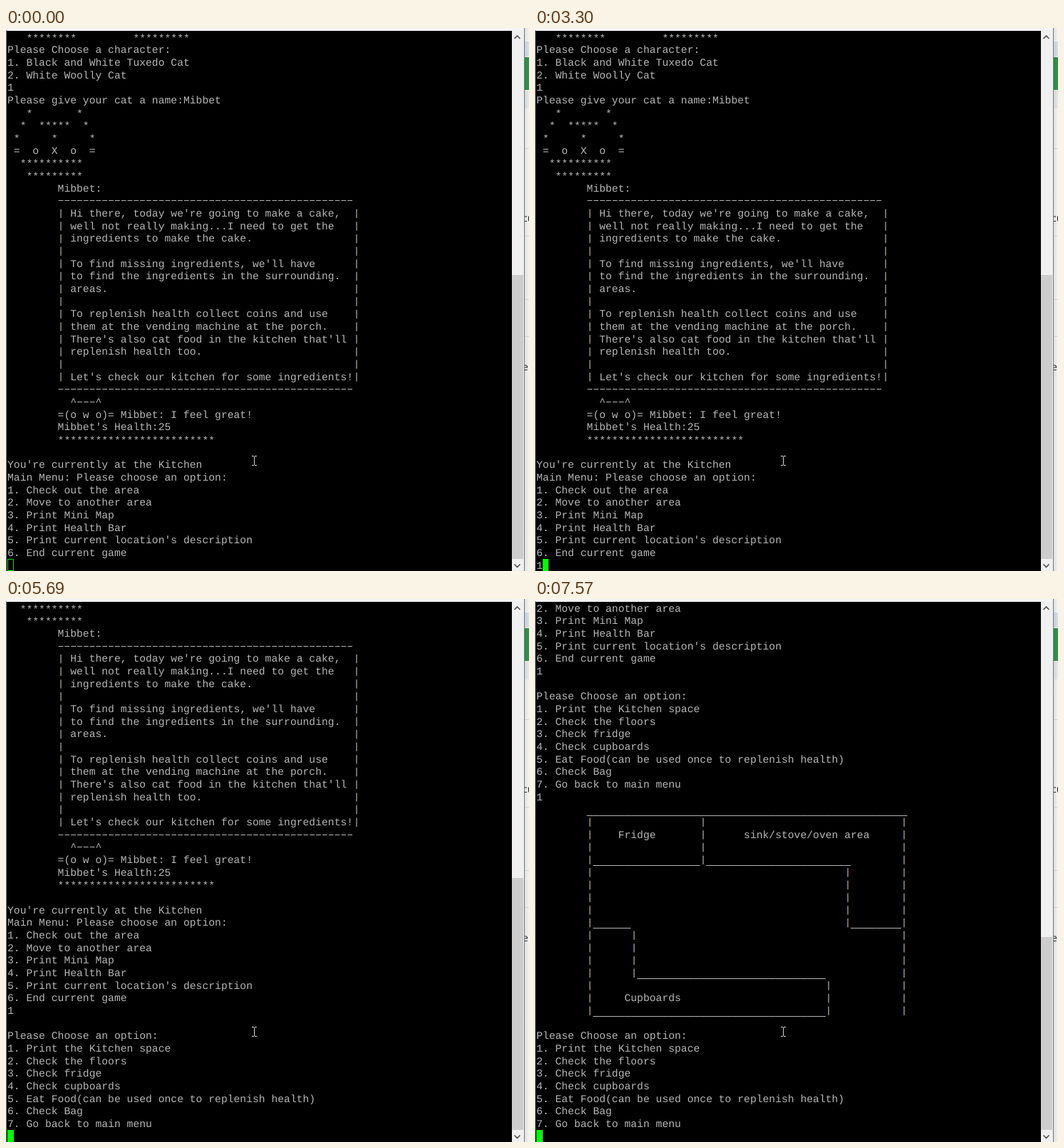
Animation of 734x763 px, one loop 8 s. Source, as an HTML page with a canvas:

```html
<!DOCTYPE html>
<html lang="en">
<head>
<meta charset="utf-8">
<title>Cat adventure terminal</title>
<style>
  html, body { margin: 0; width: 100%; height: 100%; overflow: hidden; background: #000; }
  canvas { display: block; }
</style>
</head>
<body>
<canvas id="stage" width="734" height="763"></canvas>
<script>
const ctx = document.getElementById('stage').getContext('2d');
const LOOP = 8000;
const CELL_W = 8.82, CELL_H = 17.66, LEFT = 2, TOP = 4.3;
const INK = '#b6b6b6', GREEN = '#00ff00';
const CAT = 'Mibbet';

const indent = ' '.repeat(8);
const rule = indent + '-'.repeat(47);
const speech = [
  "Hi there, today we're going to make a cake,",
  'well not really making...I need to get the',
  'ingredients to make the cake.',
  '',
  "To find missing ingredients, we'll have",
  'to find the ingredients in the surrounding.',
  'areas.',
  '',
  'To replenish health collect coins and use',
  'them at the vending machine at the porch.',
  "There's also cat food in the kitchen that'll",
  'replenish health too.',
  '',
  "Let's check our kitchen for some ingredients!"
].map(s => indent + '| ' + s.padEnd(45) + '|');

const kitchenMenu = [
  'Please Choose an option:',
  '1. Print the Kitchen space',
  '2. Check the floors',
  '3. Check fridge',
  '4. Check cupboards',
  '5. Eat Food(can be used once to replenish health)',
  '6. Check Bag',
  '7. Go back to main menu'
];

// Builds a line from [column, text] pairs.
const place = (...parts) => parts.reduce((s, [col, text]) => s.padEnd(col) + text, '');
const bar = n => '_'.repeat(n);
const walls = (...cols) => place(...cols.map(c => [c, '|']));

const kitchenMap = [
  place([8, bar(51)]),
  walls(8, 26, 58),
  place([8, '|'], [13, 'Fridge'], [26, '|'], [33, 'sink/stove/oven area'], [58, '|']),
  walls(8, 26, 58),
  place([8, '|' + bar(17) + '|' + bar(23)], [58, '|']),
  ...Array(4).fill(walls(8, 49, 58)),
  place([8, '|' + bar(6)], [49, '|' + bar(8) + '|']),
  ...Array(3).fill(walls(8, 15, 58)),
  place([8, '|'], [15, '|' + bar(30)], [58, '|']),
  walls(8, 46, 58),
  place([8, '|'], [14, 'Cupboards'], [46, '|'], [58, '|']),
  place([8, '|' + bar(37) + '|'], [58, '|'])
];

const lines = [
  place([3, '*'.repeat(8)], [20, '*'.repeat(9)]),
  'Please Choose a character:',
  '1. Black and White Tuxedo Cat',
  '2. White Woolly Cat',
  '1',
  'Please give your cat a name:' + CAT,
  '   *       *',
  '  *  *****  *',
  ' *     *     *',
  ' =  o  X  o  =',
  '  **********',
  '   *********',
  indent + CAT + ':',
  rule,
  ...speech,
  rule,
  indent + '  ^---^',
  indent + '=(o w o)= ' + CAT + ': I feel great!',
  indent + CAT + "'s Health:25",
  indent + '*'.repeat(25),
  '',
  "You're currently at the Kitchen",
  'Main Menu: Please choose an option:',
  '1. Check out the area',
  '2. Move to another area',
  '3. Print Mini Map',
  '4. Print Health Bar',
  "5. Print current location's description",
  '6. End current game',
  '1',
  '',
  ...kitchenMenu,
  '1',
  ...kitchenMap,
  '',
  ...kitchenMenu,
  ''
];

// Terminal states: first visible line, typed characters, scrollbar thumb top.
const states = [
  { at: 0, first: 0, typed: 0, thumb: 347, hollow: true },
  { at: 180, first: 0, typed: 0, thumb: 347 },
  { at: 3300, first: 0, typed: 1, thumb: 347 },
  { at: 4230, first: 10, typed: 0, thumb: 392 },
  { at: 6670, first: 10, typed: 1, thumb: 392 },
  { at: 6920, first: 37, typed: 0, thumb: 475 }
];
const LAST_ROW = 42;

function rect(color, x, y, w, h) {
  ctx.fillStyle = color;
  ctx.fillRect(x, y, w, h);
}

function stroke(color, width, points) {
  ctx.strokeStyle = color;
  ctx.lineWidth = width;
  ctx.beginPath();
  points.forEach(([x, y], i) => i ? ctx.lineTo(x, y) : ctx.moveTo(x, y));
  ctx.stroke();
}

// A vertical bar has the blue and orange fringes of subpixel rendering.
function drawPipe(x, y) {
  const left = Math.floor(x + 3.9);
  rect('#44708f', left, y + 3, 1, 12.5);
  rect('#8f6a3c', left + 1, y + 3, 1, 12.5);
}

function drawGlyph(ch, col, y) {
  const x = LEFT + col * CELL_W;
  if (ch === '_') rect(INK, x, Math.floor(y + 17.15), CELL_W + 0.2, 1);
  else if (ch === '-') rect(INK, x + 1, Math.floor(y + 9), 6.8, 1);
  else if (ch === '|') drawPipe(x, y);
  else if (ch !== ' ') {
    ctx.fillStyle = INK;
    ctx.fillText(ch, x, y + 13.5 + (ch === '*' ? 1 : 0));
  }
}

function drawTerminal({ first, typed, hollow }) {
  rect('#000', 1, 4, 709, 759);
  ctx.font = '14.7px "Liberation Mono", "Courier New", monospace';
  ctx.textRendering = 'geometricPrecision';
  for (let row = 0; row <= LAST_ROW; row++) {
    const text = lines[first + row];
    const shown = row === LAST_ROW ? text.slice(0, typed) : text;
    [...shown].forEach((ch, col) => drawGlyph(ch, col, TOP + row * CELL_H));
  }
  const x = Math.round(LEFT + typed * CELL_W);
  if (hollow) {
    ctx.strokeStyle = '#00d800';
    ctx.lineWidth = 1;
    ctx.strokeRect(x + 0.5, 746.5, 8, 16);
  } else {
    rect(GREEN, x, 746, typed ? 8 : 9, 17);
  }
}

function drawPageBehind() {
  rect('#fafbfc', 727, 0, 7, 763);
  rect('#dce8f3', 727, 19, 7, 21);
  rect('#2f9a4e', 727, 41, 7, 46);
  rect('#eef1f4', 727, 88, 7, 25);
  for (const y of [169, 292, 381, 433]) rect('#dfe2e5', 727, y, 7, 1);
  ctx.fillStyle = '#24292e';
  ctx.font = '14px "Open Sans", "Noto Sans", sans-serif';
  ctx.fillText('cu', 725, 272);
  ctx.fillText('e', 725, 481);
  const shadow = ctx.createLinearGradient(727, 0, 734, 0);
  shadow.addColorStop(0, 'rgba(0,0,0,0.12)');
  shadow.addColorStop(1, 'rgba(0,0,0,0.03)');
  rect(shadow, 727, 0, 7, 763);
}

function drawScrollbar(thumb) {
  rect('#f0f0f0', 710, 3, 17, 760);
  rect('#cdcdcd', 710, thumb, 16, 746 - thumb);
  stroke('#505050', 1.6, [[713.5, 15], [717.5, 11], [721.5, 15]]);
  stroke('#505050', 1.6, [[713.5, 753.5], [717.5, 757.5], [721.5, 753.5]]);
  rect('#75787a', 727, 0, 1, 763);
}

function drawPointer() {
  const c = '#d8d8d8';
  rect(c, 348, 602, 1, 12);
  for (const y of [601, 614]) {
    rect(c, 345, y, 3, 1);
    rect(c, 349, y, 3, 1);
  }
}

function frame() {
  const t = performance.now() % LOOP;
  const state = states.findLast(s => t >= s.at);
  rect('#f4f4f4', 0, 0, 734, 763);
  drawPageBehind();
  rect('#777', 0, 3, 1, 760);
  drawTerminal(state);
  drawScrollbar(state.thumb);
  drawPointer();
  requestAnimationFrame(frame);
}
frame();
</script>
</body>
</html>
```
